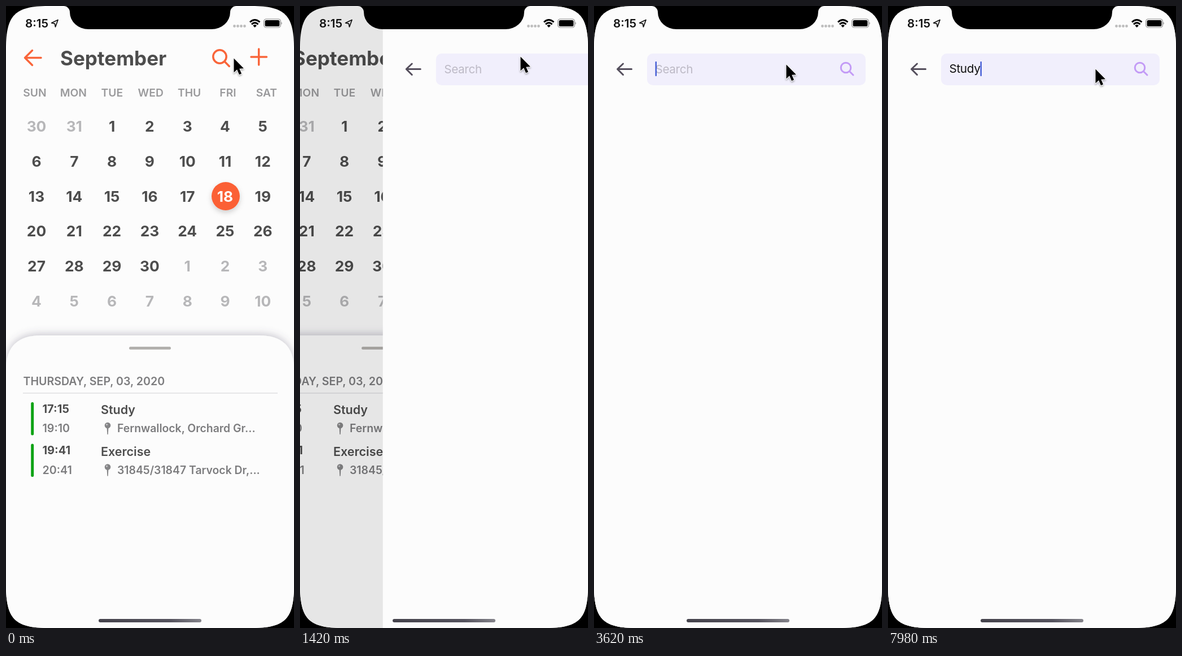
These frames come from a looping animation (510 px wide and 1099 px high, 8 s). An HTML page:

```html
<!DOCTYPE html>
<html lang="en">
<head>
<meta charset="utf-8">
<title>Calendar search</title>
<style>
  html, body { margin: 0; width: 100%; height: 100%; overflow: hidden; background: #000; }
  svg { display: block; width: 100vw; height: 100vh; font-family: Inter, "Liberation Sans", sans-serif; }
  text { white-space: pre; }
  .line { fill: none; stroke-linecap: round; stroke-linejoin: round; }
</style>
</head>
<body>
<svg id="stage" viewBox="0 0 510 1099" preserveAspectRatio="none">
  <defs>
    <clipPath id="screen">
      <path d="M0 75C0 16 16 0 75 0H435C494 0 510 16 510 75V1024C510 1083 494 1099 435 1099H75C16 1099 0 1083 0 1024Z"/>
    </clipPath>
    <filter id="sheetShadow" x="-10%" y="-10%" width="120%" height="120%">
      <feDropShadow dx="0" dy="-3" stdDeviation="7" flood-color="#55506a" flood-opacity=".3"/>
    </filter>
    <filter id="dayShadow" x="-50%" y="-50%" width="200%" height="200%">
      <feDropShadow dx="0" dy="4" stdDeviation="5" flood-color="#000" flood-opacity=".18"/>
    </filter>
    <filter id="cursorShadow" x="-50%" y="-50%" width="200%" height="200%">
      <feDropShadow dx="0" dy="2" stdDeviation="1.5" flood-color="#000" flood-opacity=".35"/>
    </filter>
    <linearGradient id="homeFill">
      <stop offset="0" stop-color="#45434c"/>
      <stop offset=".7" stop-color="#55535e"/>
      <stop offset="1" stop-color="#85848b"/>
    </linearGradient>
  </defs>

  <g clip-path="url(#screen)">
    <rect width="510" height="1099" fill="#fcfcfc"/>
    <g id="calendar">
      <g class="line" stroke="#f9653a" stroke-width="3.5">
        <path d="M62 91.500H34M46.500 78.500L33.500 91.500L46.500 104.500"/>
        <circle cx="378.500" cy="89.500" r="11.700"/>
        <path d="M387 98L395.300 106.500M434 90H461.500M447.700 76V104"/>
      </g>
      <circle cx="389" cy="336" r="25" fill="#fb6035" filter="url(#dayShadow)"/>
      <path d="M0 1150V642Q0 582 62 582H448Q510 582 510 642V1150Z" fill="#fcfcfc" filter="url(#sheetShadow)"/>
      <rect x="218" y="602" width="74" height="5" rx="2.500" fill="#b2b0ad"/>
      <rect x="30" y="683" width="451" height="2" fill="#e6e6e8"/>
    </g>
    <rect id="shade" width="510" height="1099"/>

    <g id="search">
      <rect width="510" height="1099" fill="#fcfcfc"/>
      <path class="line" d="M66.500 111.500H42M51.500 102L41.500 111.500L51.500 121.500" stroke="#544e5c" stroke-width="3"/>
      <rect x="94" y="84" width="387" height="56" rx="10" fill="#f1effc"/>
      <g class="line" stroke="#c39bf6" stroke-width="3">
        <circle cx="446" cy="109" r="8.800"/>
        <path d="M452.500 115.500L459 122"/>
      </g>
      <rect id="caret" y="98" width="2.500" height="26" rx="1" fill="#4760d6"/>
    </g>

    <g id="status">
      <path class="line" d="M92 24.500L80.500 30L86.300 31.200L87.500 37Z" stroke="#111" stroke-width="1.7"/>
      <g fill="#bdbdbd">
        <circle cx="404.500" cy="35.500" r="2.400"/><circle cx="410.500" cy="35.500" r="2.400"/>
        <circle cx="416.500" cy="35.500" r="2.400"/><circle cx="422.500" cy="35.500" r="2.400"/>
      </g>
      <g fill="none" stroke="#000" stroke-width="3">
        <path d="M432 28.500Q440.500 20.500 449.500 28.500M435 32.300Q440.500 27 446.500 32.300"/>
      </g>
      <path d="M437.300 34.500Q440.700 31.500 444 34.500L440.700 38Z"/>
      <rect x="456.700" y="23" width="29.600" height="15" rx="4.300" fill="none" stroke="#8b8b8b" stroke-width="1.2"/>
      <rect x="458.600" y="24.900" width="25.800" height="11.200" rx="2.600"/>
      <path d="M487.500 28Q490 30.500 487.500 33Z" fill="#8b8b8b"/>
    </g>
    <rect x="164" y="1083" width="182" height="6" rx="3" fill="url(#homeFill)"/>
  </g>

  <path d="M102 0A11 11 0 0 1 113 11A33 30 0 0 0 146 41H364A33 30 0 0 0 397 11A11 11 0 0 1 408 0Z"/>
  <path id="cursor" d="M0 0V25L5.600 19.700L9.500 28.700L13.600 27L9.800 18.200L17.500 17.800Z"
        stroke="#fff" stroke-width="1.8" stroke-linejoin="round" paint-order="stroke" filter="url(#cursorShadow)"/>
</svg>

<script>
const LOOP = 8000;
const $ = id => document.getElementById(id);

function add(parent, tag, attrs, content = "") {
  const node = document.createElementNS("http://www.w3.org/2000/svg", tag);
  for (const key in attrs) node.setAttribute(key, attrs[key]);
  node.textContent = content;
  return parent.appendChild(node);
}

function label(parent, content, x, y, size, fill, more = {}) {
  return add(parent, "text", { x, y, fill, "font-size": size, "font-weight": 600, ...more }, content);
}

const calendar = $("calendar"), search = $("search");
const middle = { "text-anchor": "middle" };
const bold = { "font-weight": 700 };
const dark = "#4d4d4d", mid = "#7c7c7e";

label($("status"), "8:15", 34, 38, 20.6, "#111");
label(calendar, "September", 96, 104.5, 35, dark, bold);

["SUN", "MON", "TUE", "WED", "THU", "FRI", "SAT"].forEach((name, i) =>
  label(calendar, name, 51 + 68.4 * i, 160.3, 19.3, "#9a9a9c", middle));

for (let i = 0; i < 42; i++) {
  const inMonth = i > 1 && i < 32;
  const day = i < 2 ? 30 + i : inMonth ? i - 1 : i - 31;
  const fill = !inMonth ? "#b7b7b9" : day === 18 ? "#fff" : dark;
  label(calendar, day, 54 + 66.8 * (i % 7), 222.3 + 61.65 * Math.floor(i / 7), 26.3, fill, { ...middle, ...bold });
}

label(calendar, "THURSDAY, SEP, 03, 2020", 30.5, 670, 19.6, mid);

[
  ["17:15", "19:10", "Study", "Fernwallock, Orchard Gr..."],
  ["19:41", "20:41", "Exercise", "31845/31847 Tarvock Dr,..."]
].forEach(([start, end, title, place], i) => {
  const row = add(calendar, "g", { transform: `translate(0 ${73.6 * i})` });
  add(row, "rect", { x: 44.2, y: 700, width: 5, height: 58.5, rx: 2.5, fill: "#0ca314" });
  label(row, start, 64.5, 718.5, 20, dark, bold);
  label(row, end, 64.5, 753.3, 19.7, mid);
  label(row, title, 168, 721, 21.5, dark);
  add(row, "circle", { cx: 180, cy: 741, r: 5.3, fill: "#858587" });
  add(row, "circle", { cx: 178.5, cy: 739.5, r: 1.6, fill: "#c4c4c6" });
  add(row, "path", { d: "M178.600 745H181.400L180.700 757H179.300Z", fill: "#858587" });
  label(row, place, 197, 753.3, 19.4, mid);
});

const fieldStyle = { "font-weight": 400, "letter-spacing": -0.35 };
const hint = label(search, "Search", 108.5, 119, 20.7, "#bdbac6", fieldStyle);
const typed = label(search, "", 108.5, 118.3, 20.7, "#111", fieldStyle);
search.append($("caret"));

// Playback is uneven: each 140 ms holds one step for 100 ms and two for 20 ms.
function stepAt(ms) {
  if (ms < 20) return 0;
  const cycle = Math.floor((ms - 20) / 140), rest = (ms - 20) % 140;
  return 3 * cycle + 1 + (rest < 100 ? 0 : rest < 120 ? 1 : 2);
}

// Critically damped spring
function slideAt(step) {
  const x = Math.max(0, 0.963 + 0.307 * (step - 26) + 0.04 * Math.max(0, step - 31));
  return 1 - (1 + x) * Math.exp(-x);
}

const moves = [
  { from: 2, to: 15, dx: -13, dy: -3 },
  { from: 45, to: 62, dx: -50, dy: 14 },
  { from: 160, to: 170, dx: 27, dy: 8 }
];
function cursorAt(step) {
  let x = 403.5, y = 92.5;
  for (const { from, to, dx, dy } of moves) {
    const u = Math.min(1, Math.max(0, (step - from) / (to - from)));
    const eased = u * u * (3 - 2 * u);
    x += dx * eased;
    y += dy * eased;
  }
  return [x, y];
}

const focusStep = 70;
const keySteps = [122, 131, 141, 149, 156];

function draw(ms) {
  const step = stepAt(ms), p = slideAt(step);
  calendar.setAttribute("transform", `translate(${-153 * p} 0)`);
  search.setAttribute("transform", `translate(${510 * (1 - p)} 0)`);
  $("shade").setAttribute("opacity", 0.12 * p);
  $("cursor").setAttribute("transform", `translate(${cursorAt(step)})`);

  const count = keySteps.filter(key => step >= key).length;
  typed.textContent = "Study".slice(0, count);
  hint.setAttribute("visibility", count ? "hidden" : "visible");
  $("caret").setAttribute("x", 108.5 + (count ? typed.getComputedTextLength() : 0));
  $("caret").setAttribute("visibility", step >= focusStep ? "visible" : "hidden");
}

const origin = performance.now();
function tick() {
  draw((performance.now() - origin) % LOOP);
  requestAnimationFrame(tick);
}
tick();
</script>
</body>
</html>
```
